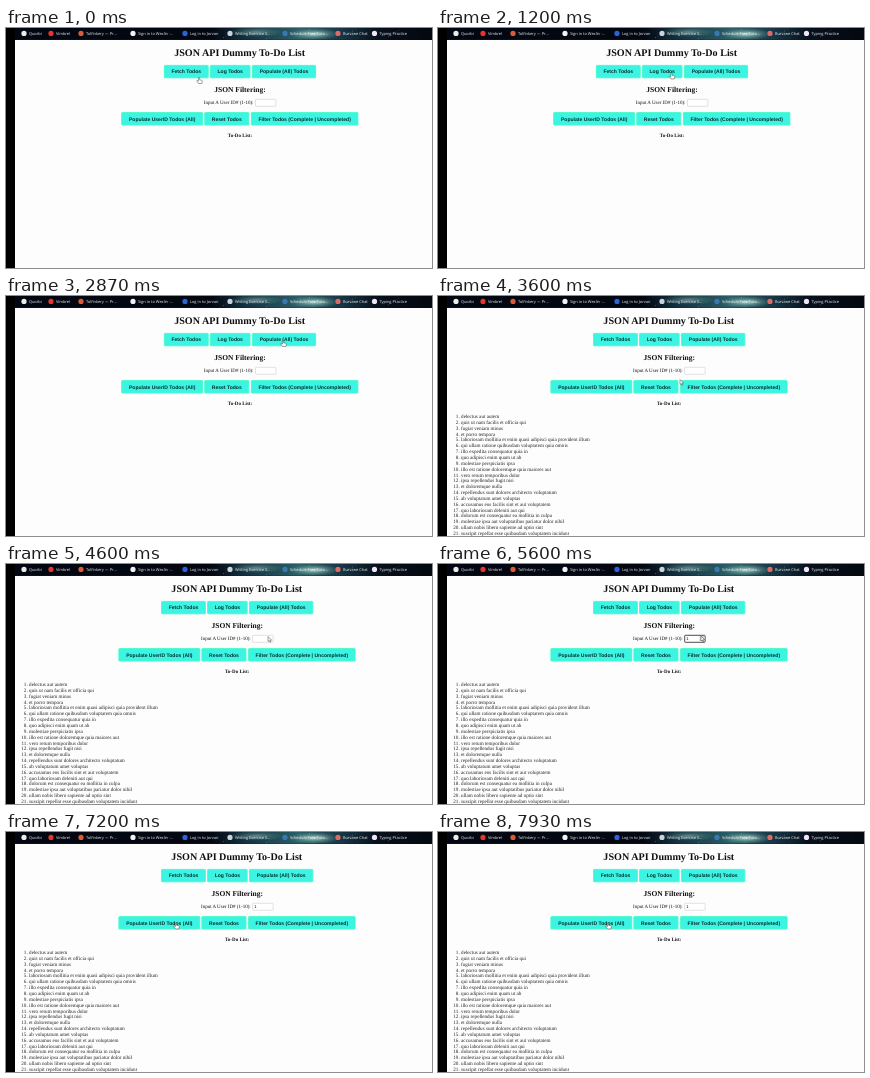
These frames come from a looping animation (426x240 px, 8000 ms). An HTML page:

```html
<!DOCTYPE html>
<html lang="en">
<head>
<meta charset="utf-8">
<title>To-Do List</title>
<style>
  html, body { margin: 0; width: 100%; height: 100%; overflow: hidden; background: #000; }
  svg { display: block; width: 100%; height: 100%; }
  text { text-rendering: geometricPrecision; fill: #111; font: 5px "Liberation Serif", serif; }
  .mid { text-anchor: middle; }
  .bold { font-weight: bold; }
  .btn { font: bold 5.05px "Liberation Sans", sans-serif; text-anchor: middle; fill: #06302c; }
  .tab { font: 3.95px "Open Sans", sans-serif; fill: #f4f5f7; }
  .num { text-anchor: end; }
  #list text { font-size: 5.12px; fill: #222; }
</style>
</head>
<body>
<svg id="stage" viewBox="0 0 426 240">
  <defs>
    <linearGradient id="sky">
      <stop offset="0" stop-color="#030711"/>
      <stop offset=".15" stop-color="#12303f"/>
      <stop offset=".4" stop-color="#2c5f68"/>
      <stop offset=".6" stop-color="#173444"/>
      <stop offset=".75" stop-color="#07101c"/>
      <stop offset="1" stop-color="#04080f"/>
    </linearGradient>
    <radialGradient id="glow">
      <stop offset="0" stop-color="#d3f0e2" stop-opacity=".85"/>
      <stop offset="1" stop-color="#5aa39c" stop-opacity="0"/>
    </radialGradient>
  </defs>
  <rect width="426" height="240"/>
  <rect x="9" y="11.8" width="417" height="228.2" fill="#fdfdfd"/>
  <g id="bar">
    <rect x="9" width="417" height="11.8" fill="#030711"/>
    <rect x="205" width="221" height="11.8" fill="url(#sky)"/>
    <ellipse cx="250" cy="4" rx="28" ry="5" fill="url(#glow)" opacity=".5"/>
    <ellipse cx="308" cy="6" rx="26" ry="6" fill="url(#glow)"/>
  </g>
  <g id="page">
    <text class="mid bold" x="233.6" y="27.6" style="font-size:10.12px">JSON API Dummy To-Do List</text>
    <text class="mid bold" x="234" y="63.6" style="font-size:7.5px">JSON Filtering:</text>
    <text x="197.8" y="76.4">Input A User ID# (1-10):</text>
    <rect id="field" x="249.5" y="71.3" width="20.4" height="7" rx=".7" fill="#fff"/>
    <text id="value" x="251" y="76.3" style="font:4.2px 'Liberation Sans',sans-serif">1</text>
    <g id="spin">
      <rect x="264.2" y="72" width="4.9" height="5.6" fill="#d8d8d8"/>
      <path d="M265.4 74.2l1.2-1.4 1.2 1.4zM265.4 75.4l1.2 1.4 1.2-1.4z" fill="#555"/>
    </g>
    <text class="mid bold" x="234" y="108.8">To-Do List:</text>
  </g>
  <g id="list"></g>
  <g id="cursor" stroke="#333" stroke-width=".45" stroke-linejoin="round" fill="#fff">
    <path id="hand" d="M-.6 .2Q0-.4 .6 .2V2.3L2.9 2.8Q3.5 3 3.4 3.8L2.8 6H-.5L-2.2 3.7Q-2.3 2.9-1.5 3L-.6 3.6Z"/>
    <path id="arrow" d="M0 0V5L1.2 4 2 5.8 2.9 5.4 2.1 3.7H3.6Z"/>
  </g>
</svg>
<script>
const LOOP = 8000, LIST_AT = 2930, FOCUS_AT = 4700, BLUR_AT = 6800;
const $ = id => document.getElementById(id);

function add(parent, tag, attrs, text) {
  const el = document.createElementNS($("stage").namespaceURI, tag);
  for (const k in attrs) el.setAttribute(k, attrs[k]);
  if (text) el.textContent = text;
  return parent.appendChild(el);
}

// Stars along the top strip
for (let i = 0; i < 26; i++) {
  const x = 215 + (i * 83.7) % 208, y = 1 + (i * 3.71) % 10;
  add($("bar"), "circle", { cx: x, cy: y, r: .25 + i % 3 * .1, fill: "#b5d5d8", opacity: .6 });
}

// Bookmarks: icon x, icon colour, label
[
  [18, "#e9ede8", "Quorbi"],
  [45, "#e8352c", "Vimbrel"],
  [75, "#dc5a35", "Tolfinkery — Pr..."],
  [127, "#f2f2f2", "Sign in to Wexlin ·..."],
  [179, "#2f62d8", "Log in to Jorvan"],
  [224, "#c9d3d8", "Writing Exercise S..."],
  [279, "#3a78b4", "Schedule Free Tuto..."],
  [332, "#e06a62", "Burvane Chat"],
  [368.5, "#ece6f6", "Typing Practice"]
].forEach(([x, fill, label]) => {
  add($("bar"), "circle", { cx: x, cy: 5.4, r: 2.6, fill });
  add($("bar"), "text", { class: "tab", x: x + 4.9, y: 6.9 }, label);
});

function button(x, y, w, label) {
  add($("page"), "rect", {
    x: x + .4, y: y + .4, width: w - .8, height: 12.4, rx: .6,
    fill: "#3cf4e4", stroke: "#42fcc4", "stroke-width": .9
  });
  add($("page"), "text", { class: "btn", x: x + w / 2, y: y + 8.3 }, label);
}
button(158, 37, 44.6, "Fetch Todos");
button(204, 37, 40.4, "Log Todos");
button(246, 37, 64, "Populate (All) Todos");
button(115.3, 84.2, 81.7, "Populate UserID Todos (All)");
button(198.3, 84.2, 44.9, "Reset Todos");
button(245, 84.2, 107.3, "Filter Todos (Complete | Uncompleted)");

`delectus aut autem
quis ut nam facilis et officia qui
fugiat veniam minus
et porro tempora
laboriosam mollitia et enim quasi adipisci quia provident illum
qui ullam ratione quibusdam voluptatem quia omnis
illo expedita consequatur quia in
quo adipisci enim quam ut ab
molestiae perspiciatis ipsa
illo est ratione doloremque quia maiores aut
vero rerum temporibus dolor
ipsa repellendus fugit nisi
et doloremque nulla
repellendus sunt dolores architecto voluptatum
ab voluptatum amet voluptas
accusamus eos facilis sint et aut voluptatem
quo laboriosam deleniti aut qui
dolorum est consequatur ea mollitia in culpa
molestiae ipsa aut voluptatibus pariatur dolor nihil
ullam nobis libero sapiente ad optio sint
suscipit repellat esse quibusdam voluptatem incidunt`.split("\n").forEach((item, i) => {
  const y = 122 + i * 5.85;
  add($("list"), "text", { class: "num", x: 21.7, y }, i + 1 + ".");
  add($("list"), "text", { x: 23.1, y }, item);
});

// Pointer stops: time, x, y
const path = [
  [0, 193, 49.5], [500, 193, 49.5], [1000, 233, 45.5], [1200, 233.5, 45],
  [2130, 236, 43.5], [2550, 277, 44.5], [3000, 277, 44.5], [3550, 242, 83.5],
  [3800, 242, 83.5], [4500, 262, 72.5], [5700, 263, 72],
  [6250, 175, 93], [6500, 175, 93], [7200, 170, 91], [LOOP, 170, 91]
];

function pointer(t) {
  const i = path.findIndex(p => p[0] > t);
  const [t0, x0, y0] = path[i - 1], [t1, x1, y1] = path[i];
  const u = (t - t0) / (t1 - t0), e = u * u * (3 - 2 * u);
  return [x0 + (x1 - x0) * e, y0 + (y1 - y0) * e];
}

const show = (id, on) => $(id).setAttribute("visibility", on ? "visible" : "hidden");

function draw(t) {
  const [x, y] = pointer(t);
  const listed = t >= LIST_AT, focused = t >= FOCUS_AT && t < BLUR_AT;
  const overButton = (y > 37 && y < 50.2) || (y > 84.2 && y < 97.4);
  $("page").setAttribute("transform", `translate(${listed ? -2.8 : 0} 0)`);
  show("list", listed);
  show("value", t >= FOCUS_AT);
  show("spin", focused);
  $("field").setAttribute("stroke", focused ? "#222" : "#aaa");
  $("field").setAttribute("stroke-width", focused ? .8 : .35);
  $("cursor").setAttribute("transform", `translate(${x} ${y})`);
  show("hand", overButton);
  show("arrow", !overButton);
}

const start = performance.now();
function tick() {
  draw((performance.now() - start) % LOOP);
  requestAnimationFrame(tick);
}
tick();
</script>
</body>
</html>
```
